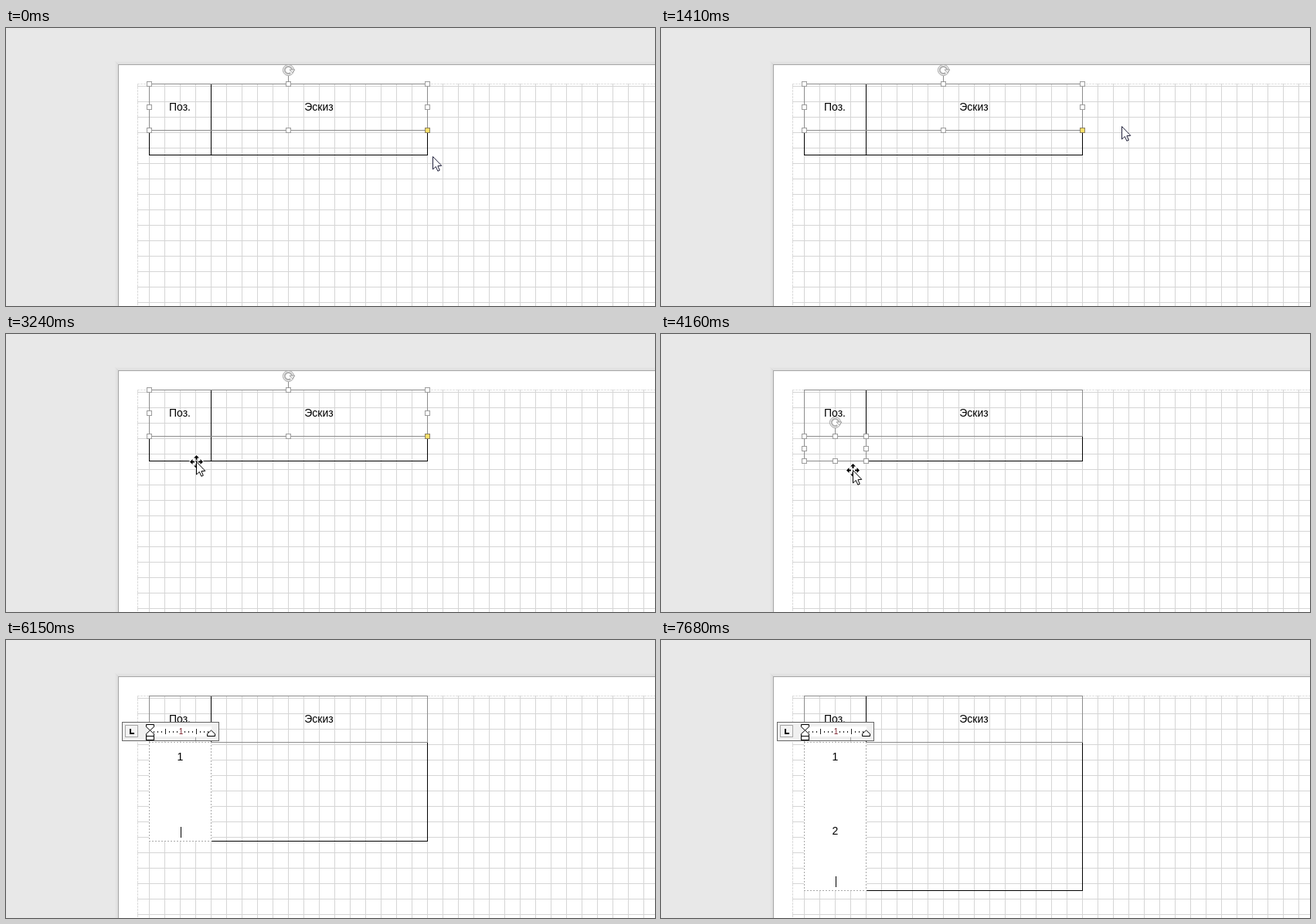
Write an HTML page with a canvas that moves like this. It is 840 px wide and 360 px high and loops after 8000 ms.

```html
<!DOCTYPE html>
<html lang="ru">
<head>
<meta charset="utf-8">
<style>
html, body { margin: 0; width: 100%; height: 100%; overflow: hidden; background: #e8e8e8; }
canvas { display: block; }
</style>
</head>
<body>
<canvas id="stage" width="840" height="360"></canvas>
<script>
const ctx = document.getElementById('stage').getContext('2d');
const LOOP = 8000;
const LEFT = 185, SPLIT = 265, RIGHT = 545, TOP = 72, MID = 132, ROW = 32;
const GREY = '#8c8c8c', BLACK = '#000', GRID = '#d5d5d5';

const STEP = 151, PHASE = 55;
const LEGS = [
  [120, 552, 166], [400, 370, 223], [600, 142, 130], [810, 220, 19],
  [1110, 555, 61], [1260, 596, 126], [1410, 592, 176], [1720, 592, 176],
  [2169, 258, 179], [2470, 246, 165], [3550, 246, 165], [4310, 248, 180]
];

// One mark per beat: digit, n = new line, | = caret blinks off, dot = wait
const KEYS = '1..n.n.n..|.2.n.n', TYPE_START = 5070, BEAT = 154;

function pointerAt(t) {
  const s = Math.floor((t - PHASE) / STEP) * STEP + PHASE;
  const next = LEGS.findIndex(leg => leg[0] > s);
  const b = LEGS[next < 0 ? LEGS.length - 1 : next];
  const a = next > 0 ? LEGS[next - 1] : b;
  const k = a === b ? 0 : (s - a[0]) / (b[0] - a[0]);
  return [1, 2].map(i => Math.round(a[i] + (b[i] - a[i]) * k));
}

function typedAt(t) {
  const lines = [''];
  let caret = true;
  for (const key of KEYS.slice(0, Math.max(0, Math.floor((t - TYPE_START) / BEAT) + 1))) {
    if (key === '.') continue;
    caret = key !== '|';
    if (key === 'n') lines.push('');
    else if (caret) lines[lines.length - 1] += key;
  }
  return { lines, caret };
}

function rect(x, y, w, h, color) {
  ctx.fillStyle = color;
  ctx.fillRect(x, y, w, h);
}
const hline = (x1, x2, y, color) => rect(x1, y, x2 - x1 + 1, 1, color);
const vline = (x, y1, y2, color) => rect(x, y1, 1, y2 - y1 + 1, color);

function frame(x1, y1, x2, y2, color) {
  hline(x1, x2, y1, color);
  hline(x1, x2, y2, color);
  vline(x1, y1, y2, color);
  vline(x2, y1, y2, color);
}

function box(x, y, w, h, fill, edge) {
  rect(x, y, w, h, edge);
  rect(x + 1, y + 1, w - 2, h - 2, fill);
}

function trace(points) {
  ctx.beginPath();
  points.forEach(([x, y]) => ctx.lineTo(x, y));
  ctx.closePath();
}

function stroke(color, width = 1) {
  ctx.strokeStyle = color;
  ctx.lineWidth = width;
  ctx.stroke();
}

function shape(points, fill, edge) {
  trace(points);
  ctx.fillStyle = fill;
  ctx.fill();
  stroke(edge);
}

function label(text, x, y, size = 14, color = BLACK) {
  ctx.font = size + 'px "Liberation Sans", Arial, sans-serif';
  ctx.textAlign = 'center';
  ctx.fillStyle = color;
  ctx.fillText(text, x, y);
}

function drawPage() {
  rect(0, 0, 840, 360, '#e8e8e8');
  for (let i = 1; i < 5; i++) {
    frame(145 - i, 47 - i, 900, 400, `rgba(0,0,0,${0.05 - i * 0.01})`);
  }
  box(145, 47, 700, 320, '#fff', '#a6a6a6');
  for (let x = LEFT; x < 840; x += 20) vline(x, TOP, 360, GRID);
  for (let y = 75; y < 360; y += 20) hline(170, 840, y, GRID);
  for (let x = 170; x < 840; x += 4) hline(x, x + 2, TOP, '#e0e0e0');
  for (let y = TOP; y < 360; y += 4) vline(170, y, y + 2, '#dadada');
}

function drawTable(bottom) {
  frame(LEFT, TOP, RIGHT, bottom, BLACK);
  hline(LEFT, RIGHT, MID, BLACK);
  vline(SPLIT, TOP, bottom, BLACK);
  label('Поз.', 225, 107);
  label('Эскиз', 405, 107);
}

function drawRotator(x, y) {
  vline(x, y + 8, y + 15, GREY);
  ctx.beginPath();
  ctx.arc(x + 0.5, y + 0.5, 7, 0, Math.PI * 2);
  ctx.fillStyle = '#fff';
  ctx.fill();
  stroke('#9c9c9c');
  ctx.beginPath();
  ctx.arc(x + 0.5, y + 0.5, 4.6, 0.9, Math.PI * 2);
  stroke('#b0b0b0', 2);
  shape([[x + 2, y], [x + 9, y], [x + 5.5, y + 3.8]], '#fff', '#9c9c9c');
}

function drawSelection(x1, y1, x2, y2, corner) {
  const cx = (x1 + x2) / 2, cy = (y1 + y2) / 2;
  frame(x1, y1, x2, y2, GREY);
  for (const x of [x1, cx, x2]) {
    for (const y of [y1, cy, y2]) {
      if (x !== cx || y !== cy) box(x - 3, y - 3, 7, 7, '#fff', '#9c9c9c');
    }
  }
  if (corner) box(x2 - 3, y2 - 3, 7, 7, '#ffe06a', '#8a8060');
  drawRotator(cx, y1 - 18);
}

// Indent mark: a small house, flipped by dir = -1
function indent(x, y, dir) {
  shape([[0, 0], [5, 4.5], [5, 7.5], [-5, 7.5], [-5, 4.5]]
    .map(([dx, dy]) => [x + dx, y + dy * dir]), '#fff', BLACK);
}

function drawRuler() {
  box(150, 106, 126, 25, '#f0f0f0', '#666');
  rect(187, 112, 79, 13, '#fff');
  box(154, 110, 17, 16, '#f4f4f4', '#a5a5a5');
  rect(160, 115, 2, 7, BLACK);
  rect(160, 120, 6, 2, BLACK);
  for (let i = 1; i < 16; i++) {
    const x = 186 + i * 5;
    if (i === 8) label('1', x + 0.5, 122, 10, '#7a1f2b');
    else if (i % 8 === 4) vline(x, 115, 121, '#222');
    else rect(x, 118, 1, 2, '#222');
  }
  vline(245, 126, 129, '#a0a0a0');
  indent(186.5, 117, -1);
  indent(186.5, 117, 1);
  box(181, 124, 11, 6, '#fff', BLACK);
  indent(265.5, 117, 1);
}

function drawEditor(bottom, { lines, caret }) {
  rect(LEFT, MID, SPLIT - LEFT + 1, bottom - MID + 1, '#fff');
  for (let x = LEFT; x < SPLIT; x += 4) {
    hline(x, x + 1, MID, '#b0b0b0');
    hline(x, x + 1, bottom, '#a8a8a8');
  }
  for (let y = MID; y < bottom; y += 4) {
    vline(LEFT, y, y + 1, '#a8a8a8');
    vline(SPLIT, y, y + 1, '#a8a8a8');
  }
  lines.forEach((line, row) => label(line, 225.5, 156 + row * ROW));
  const last = lines.length - 1;
  if (caret) rect(226 + lines[last].length * 4, 146 + last * ROW, 1, 14, BLACK);
}

function drawPointer([x, y], moving) {
  ctx.save();
  ctx.translate(x + 0.5, y + 0.5);
  if (moving) {
    for (let i = 0; i < 4; i++) {
      ctx.rotate(Math.PI / 2);
      trace([[0, -8.5], [3.5, -5], [1, -5], [1, -2.5], [-1, -2.5], [-1, -5], [-3.5, -5]]);
      stroke('#fff', 2);
      ctx.fillStyle = BLACK;
      ctx.fill();
    }
  }
  shape([[0, 0], [0, 16.5], [3.8, 13], [6.4, 18.8], [8.8, 17.7], [6.4, 12.2], [11.3, 11.8]],
    '#fff', moving ? BLACK : '#20203a');
  ctx.restore();
}

function draw(t) {
  const text = typedAt(t);
  const bottom = MID + text.lines.length * ROW;
  drawPage();
  drawTable(bottom);
  if (t < 1720 || (t >= 3240 && t < 4160)) drawSelection(LEFT, TOP, RIGHT, MID, true);
  if (t >= 4160) {
    frame(LEFT, TOP, RIGHT, MID, GREY);
    vline(SPLIT, TOP + 1, MID - 1, BLACK);
    if (t < 4610) drawSelection(LEFT, MID, SPLIT, bottom);
  }
  if (t >= 4610) {
    drawEditor(bottom, text);
    ctx.globalAlpha = t < TYPE_START ? 0.5 : 1;
    drawRuler();
    ctx.globalAlpha = 1;
  }
  if (t < 5530) drawPointer(pointerAt(t), t >= 3240 && t < 4310);
}

const start = performance.now();
function tick() {
  draw((performance.now() - start) % LOOP);
  requestAnimationFrame(tick);
}
tick();
</script>
</body>
</html>
```
